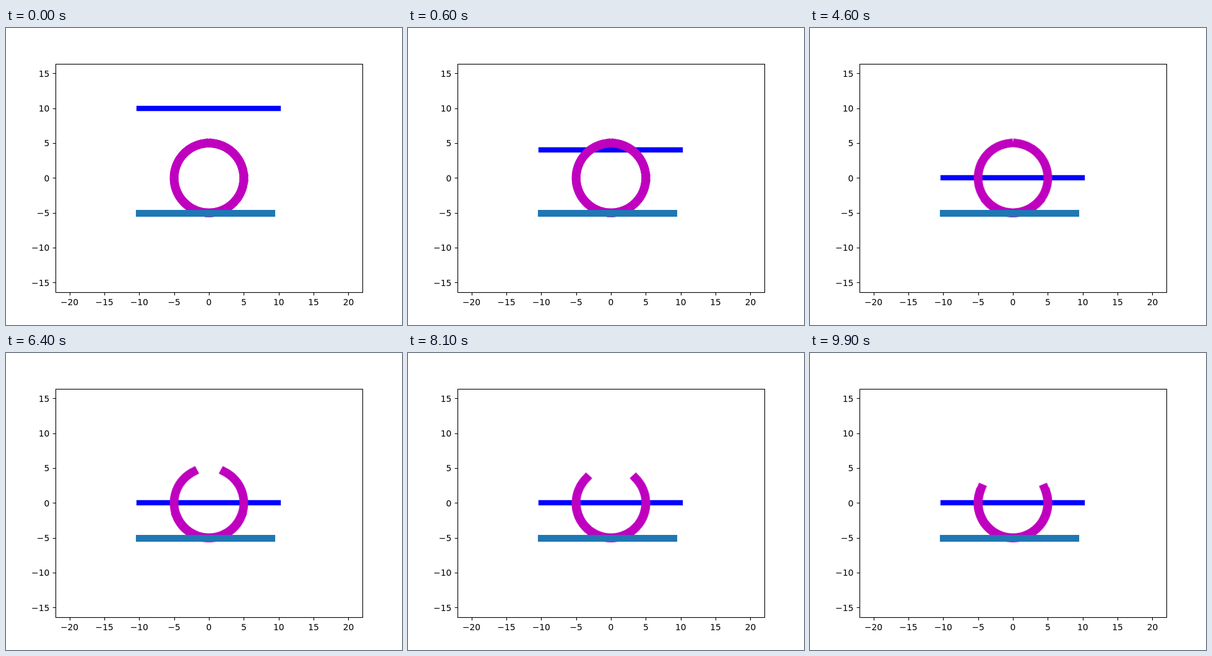
An HTML page that plays this animation: 640x480 px, repeating every 10000 ms.

```html
<!DOCTYPE html>
<html lang="en">
<head>
<meta charset="utf-8">
<title>Falling bar and opening ring</title>
<style>
  html, body { margin: 0; width: 100%; height: 100%; overflow: hidden; background: #fff; }
  svg { display: block; width: 640px; height: 480px; }
  text { font: 13.89px "DejaVu Sans", sans-serif; fill: #000; }
  .axes { fill: none; stroke: #000; stroke-width: 1.11; }
  .ring { fill: none; stroke: #bf00bf; stroke-width: 13.89; stroke-linecap: square; stroke-linejoin: round; }
  .bar { stroke: #00f; stroke-width: 8.33; stroke-linecap: square; animation: fall 10s step-end infinite; }
  .base { stroke: #1f77b4; stroke-width: 11.11; stroke-linecap: square; }
  .whole { animation: whole 10s step-end infinite; }
  .halves { animation: halves 10s step-end infinite; }
  .half { animation: open 10s infinite; }

  /* one data unit per step, snapped to whole pixels */
  @keyframes fall {
    0% { transform: translateY(130px); }
    1% { transform: translateY(141px); }
    2% { transform: translateY(152px); }
    3% { transform: translateY(163px); }
    4% { transform: translateY(175px); }
    5% { transform: translateY(186px); }
    6% { transform: translateY(197px); }
    7% { transform: translateY(209px); }
    8% { transform: translateY(220px); }
    9% { transform: translateY(231px); }
    10%, 100% { transform: translateY(242px); }
  }
  @keyframes whole {
    0%, 47% { visibility: visible; }
    46%, 64%, 100% { visibility: hidden; }
  }
  @keyframes halves {
    0%, 47% { visibility: hidden; }
    46%, 64%, 100% { visibility: visible; }
  }
  @keyframes open {
    0% { transform: rotate(6.8deg); animation-timing-function: step-end; }
    64% { transform: rotate(26.6deg); animation-timing-function: steps(36, end); }
    100% { transform: rotate(66.2deg); }
  }
</style>
</head>
<body>
<svg viewBox="0 0 640 480">
  <line class="bar" x1="215" x2="440" y1="0" y2="0"/>
  <g class="ring" transform="translate(328 242.4) scale(1 -1)">
    <g class="whole">
      <polyline data-arc="0 360"/>
      <polyline data-arc="96.8 443.2"/>
    </g>
    <g class="halves">
      <polyline class="half" data-arc="90 312"/>
      <g transform="scale(-1 1)"><polyline class="half" data-arc="90 312"/></g>
    </g>
  </g>
  <line class="base" x1="215.5" x2="429.5" y1="299.5" y2="299.5"/>
  <rect class="axes" x="80.5" y="58.5" width="496" height="369"/>
  <path class="axes" id="ticks"/>
  <g id="labels"></g>
</svg>
<script>
  const UNIT = 496 / 44, CX = 328, CY = 242.4;
  const snap = v => Math.round(v) + 0.5;

  function arc(from, to, n = 49) {
    const pts = [];
    for (let i = 0; i <= n; i++) {
      const a = (from + (to - from) * i / n) * Math.PI / 180;
      pts.push((5 * UNIT * Math.cos(a)).toFixed(3) + ',' + (5 * UNIT * Math.sin(a)).toFixed(3));
    }
    return pts.join(' ');
  }

  for (const el of document.querySelectorAll('[data-arc]')) {
    el.setAttribute('points', arc(...el.dataset.arc.split(' ').map(Number)));
  }

  const labels = document.getElementById('labels');
  function label(v, x, y, anchor) {
    const t = document.createElementNS('http://www.w3.org/2000/svg', 'text');
    t.setAttribute('x', x);
    t.setAttribute('y', y);
    t.setAttribute('text-anchor', anchor);
    t.textContent = (v < 0 ? '\u2212' : '') + Math.abs(v);
    labels.append(t);
  }

  let ticks = '';
  for (let v = -20; v <= 20; v += 5) {
    const x = CX + v * UNIT;
    ticks += `M${snap(x)} 427.5v4.86`;
    label(v, x, 448, 'middle');
    if (Math.abs(v) > 15) continue;
    const y = CY - v * UNIT;
    ticks += `M80.5 ${snap(y)}h-4.86`;
    label(v, 70.3, Math.round(y + 5.2), 'end');
  }
  document.getElementById('ticks').setAttribute('d', ticks);
</script>
</body>
</html>
```
